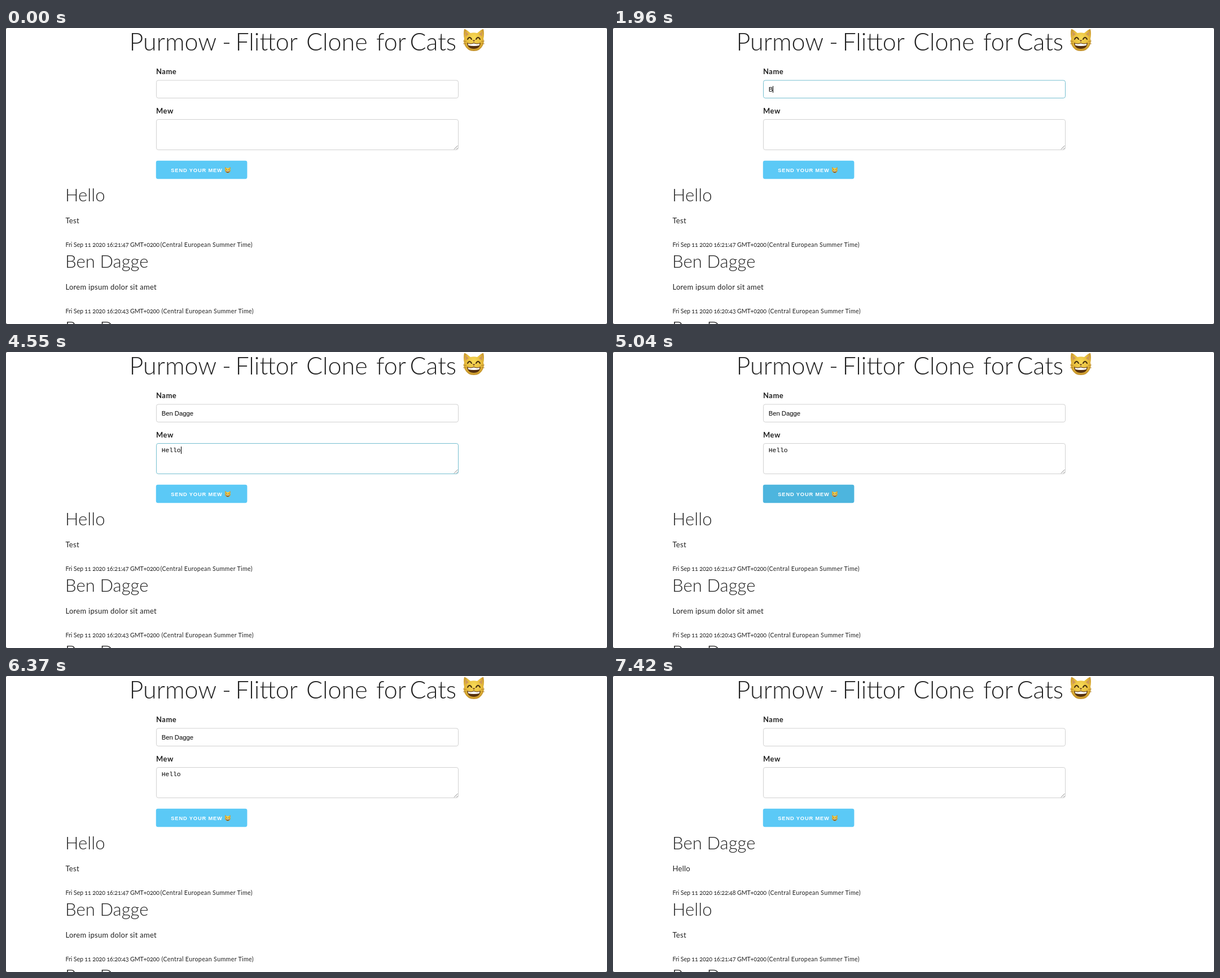
An HTML page for the animation above (8750 ms loop, 1065 by 526 pixels).

```html
<!DOCTYPE html>
<html lang="en">
<head>
<meta charset="utf-8">
<title>Purmow</title>
<style>
  html, body { margin: 0; width: 100%; height: 100%; overflow: hidden; background: #fff; }
  svg { display: block; width: 1065px; height: 526px; }
  text { fill: #222; font-family: Lato, sans-serif; font-size: 13px; white-space: pre; }
  .title { font-size: 43px; font-weight: 300; }
  .label { font-weight: 700; letter-spacing: .5px; }
  .name { font-size: 31px; font-weight: 300; letter-spacing: .1px; }
  .mew { letter-spacing: .27px; }
  .date { font-size: 10.7px; font-variant-numeric: oldstyle-nums; }
  .day { letter-spacing: -.13px; }
  .zone { letter-spacing: .33px; }
  .field { fill: #fff; stroke: #d1d1d1; }
  .field.focus { stroke: #76bfd0; }
  .input { fill: #000; font: 11.27px "Liberation Sans", Arial, sans-serif; }
  .area { fill: #000; font: 11.27px "Liberation Mono", "Courier New", monospace; }
  .send { fill: #fff; font: bold 9.3px "Liberation Sans", Arial, sans-serif; letter-spacing: .845px; }
</style>
</head>
<body>
<svg viewBox="0 0 1065 526">
  <defs>
    <radialGradient id="fur" cx=".5" cy=".4" r=".65">
      <stop offset="0" stop-color="#f8dc58"/>
      <stop offset=".65" stop-color="#e5b93a"/>
      <stop offset="1" stop-color="#b88426"/>
    </radialGradient>
    <g id="cat">
      <path d="M2 0Q4 -1 13 7Q19 5.500 25 7Q34 -1 36 0Q38 8 36 17Q38 23 35 29Q30 39 19 39Q8 39 3 29Q0 23 2 17Q0 8 2 0Z" fill="url(#fur)"/>
      <path d="M4 4L10 9L4.500 13ZM34 4L28 9L33.500 13Z" fill="#cf9a58"/>
      <path d="M8 18Q11.500 11.500 15 18M23 18Q26.500 11.500 30 18" fill="none" stroke="#48310f" stroke-width="2" stroke-linecap="round"/>
      <path d="M16.500 19.500H21.500L19 22.500Z" fill="#7a4a28"/>
      <path d="M7 24Q13 27 19 24Q25 27 31 24Q30 35 19 35Q8 35 7 24Z" fill="#56310f"/>
      <path d="M8.500 25.500Q13 27.500 19 25.200Q25 27.500 29.500 25.500L28.500 29Q19 31 9.500 29Z" fill="#fff"/>
      <path d="M0 21L6 22M0 26L5.500 25.500M38 21L32 22M38 26L32.500 25.500" stroke="#a8782a" stroke-width=".8"/>
    </g>
  </defs>

  <text class="title" y="40"><tspan x="218.500">Purmow</tspan><tspan x="383">-</tspan><tspan x="406.500">Flittor</tspan><tspan x="532">Clone</tspan><tspan x="656">for</tspan><tspan x="715.500">Cats</tspan></text>
  <use href="#cat" x="810" y="2"/>

  <text class="label" x="266" y="82">Name</text>
  <rect id="nameBox" class="field" x="266.500" y="93" width="535" height="31.500" rx="3.400"/>
  <text id="nameText" class="input" x="275.700" y="113"></text>

  <text class="label" x="266" y="151.500">Mew</text>
  <rect id="mewBox" class="field" x="266.500" y="162.500" width="535" height="54" rx="3.400"/>
  <path d="M794 215.500L800.500 209M798 215.500L800.500 213" stroke="#777" stroke-width=".9"/>
  <text id="mewText" class="area" x="275.700" y="178"></text>
  <rect id="caret" width="1" fill="#000"/>

  <rect id="button" x="265.800" y="235.700" width="161.600" height="32.500" rx="3.400"/>
  <text class="send" x="292.300" y="256">SEND YOUR MEW</text>
  <use href="#cat" transform="translate(387.800 247.200) scale(.27)"/>

  <g id="posts"></g>
  <path d="M0 0H2L0 2ZM1065 0V2L1063 0ZM0 526V524L2 526ZM1065 526H1063L1065 524Z" fill="#777"/>
</svg>
<script>
const LOOP = 8750;
const USER = 'Ben Dagge', MEW = 'Hello';
const NAME_FOCUS = 1470, MEW_FOCUS = 3290, BUTTON_FOCUS = 4970, RELEASE = 5460, POSTED = 6930;
const nameKeys = [1960, 2240, 2450, 2520, 2660, 2730, 2800, 2940, 3010];
const mewKeys = [3430, 3570, 3780, 3920, 4060];

const el = id => document.getElementById(id);
const between = (t, a, b) => t >= a && t < b;
const typed = (text, keys, t) => text.slice(0, keys.filter(k => k <= t).length);

const older = [
  { name: 'Hello', mew: 'Test', time: '16:21:47', zoneX: 273.5 },
  { name: USER, mew: 'Lorem ipsum dolor sit amet', time: '16:20:43', zoneX: 275.5 },
  { name: USER, mew: '', time: '', zoneX: 275.5 }
];
const newer = [{ name: USER, mew: MEW, time: '16:22:48', zoneX: 275.5 }, older[0], older[2]];

function postMarkup(p, i) {
  const y = i * 118;
  const date = p.time && `<text class="date" y="${y + 388.5}">` +
    `<tspan class="day" x="105.500">Fri Sep 11 2020 ${p.time} GMT+0200</tspan>` +
    `<tspan class="zone" x="${p.zoneX}">(Central European Summer Time)</tspan></text>`;
  return `<text class="name" x="105" y="${y + 307.5}">${p.name}</text>` +
    `<text class="mew" x="105.500" y="${y + 347}">${p.mew}</text>` + date;
}

let shown = null;
function showPosts(list) {
  if (list === shown) return;
  shown = list;
  el('posts').innerHTML = list.map(postMarkup).join('');
}

// The caret stays solid for half a second after each key, then blinks.
function placeCaret(t, field, top, height, start, keys) {
  const last = Math.max(start, ...keys.filter(k => k <= t));
  const on = Math.floor((t - last) / 500) % 2 === 0;
  const caret = el('caret');
  caret.setAttribute('x', Math.round(275.7 + field.getComputedTextLength()));
  caret.setAttribute('y', top);
  caret.setAttribute('height', height);
  caret.style.display = on ? '' : 'none';
}

function draw(t) {
  const inName = between(t, NAME_FOCUS, MEW_FOCUS);
  const inMew = between(t, MEW_FOCUS, BUTTON_FOCUS);
  const posted = t >= POSTED;
  el('nameText').textContent = posted ? '' : typed(USER, nameKeys, t);
  el('mewText').textContent = posted ? '' : typed(MEW, mewKeys, t);
  el('nameBox').classList.toggle('focus', inName);
  el('mewBox').classList.toggle('focus', inMew);
  el('button').setAttribute('fill', between(t, BUTTON_FOCUS, RELEASE) ? '#4db5de' : '#5bc9f6');
  if (inName) placeCaret(t, el('nameText'), 103, 12, NAME_FOCUS, nameKeys);
  else if (inMew) placeCaret(t, el('mewText'), 168, 13, MEW_FOCUS, mewKeys);
  else el('caret').style.display = 'none';
  showPosts(posted ? newer : older);
}

const begin = performance.now();
function tick() {
  draw((performance.now() - begin) % LOOP);
  requestAnimationFrame(tick);
}
tick();
</script>
</body>
</html>
```
